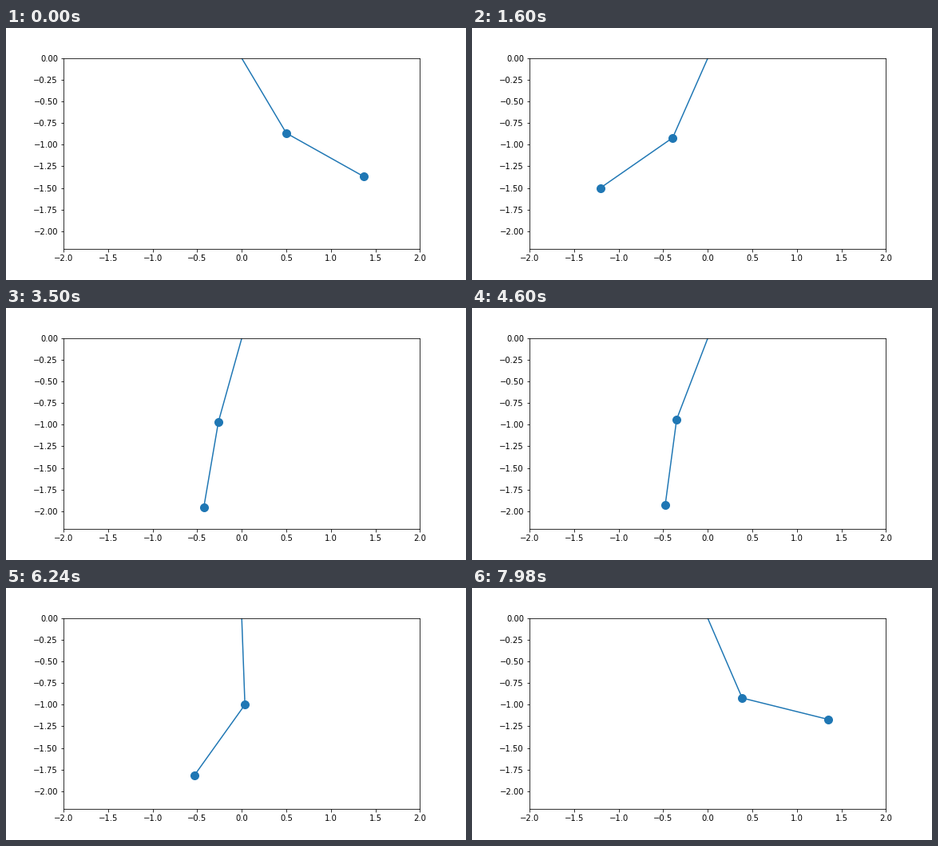
Write a matplotlib script that moves like this. It is 576 px wide and 316 px high and loops after 8000 ms.

```python
import matplotlib.pyplot as plt
import numpy as np
from matplotlib.animation import FuncAnimation

W, H, DPI = 576, 316, 72
FRAMES, STEP_MS = 400, 20
G, LENGTH, M1, M2 = 9.8, 1.0, 1.0, 1.0
SUBSTEPS = 4


def rates(s):
    """Time derivative of (angle1, angle2, speed1, speed2)."""
    a, b, u, v = s
    d = a - b
    c, sn = np.cos(d), np.sin(d)
    total = M1 + M2
    den = LENGTH * (M1 + M2 * sn * sn)
    du = (M2 * G * np.sin(b) * c - M2 * sn * LENGTH * (u * u * c + v * v)
          - total * G * np.sin(a)) / den
    dv = (total * (LENGTH * u * u * sn - G * np.sin(b) + G * np.sin(a) * c)
          + M2 * LENGTH * v * v * sn * c) / den
    return np.array([u, v, du, dv])


def swing():
    """Angles per frame, by plain Euler steps."""
    s = np.array([np.pi / 6, np.pi / 3, 0.0, 0.0])
    h = STEP_MS / 1000 / SUBSTEPS
    angles = []
    for _ in range(FRAMES):
        angles.append(s[:2])
        for _ in range(SUBSTEPS):
            s = s + h * rates(s)
    return np.array(angles)


angles = swing()
xs = LENGTH * np.cumsum(np.sin(angles), axis=1)
ys = -LENGTH * np.cumsum(np.cos(angles), axis=1)

plt.rcParams["font.family"] = "DejaVu Sans"
fig = plt.figure(figsize=(W / DPI, H / DPI), dpi=DPI, facecolor="white")
fig.subplots_adjust(left=0.125, right=0.9, bottom=0.125, top=0.88)
ax = fig.add_subplot(xlim=(-2, 2), ylim=(-2.2, 0))
rods, = ax.plot([], [], color="tab:blue", lw=1.5)
bobs, = ax.plot([], [], "o", color="tab:blue", ms=10)


def draw(i):
    rods.set_data([0, *xs[i]], [0, *ys[i]])
    bobs.set_data(xs[i], ys[i])
    return rods, bobs


anim = FuncAnimation(fig, draw, frames=FRAMES, interval=STEP_MS,
                     repeat=True, repeat_delay=0)
plt.show()
```
